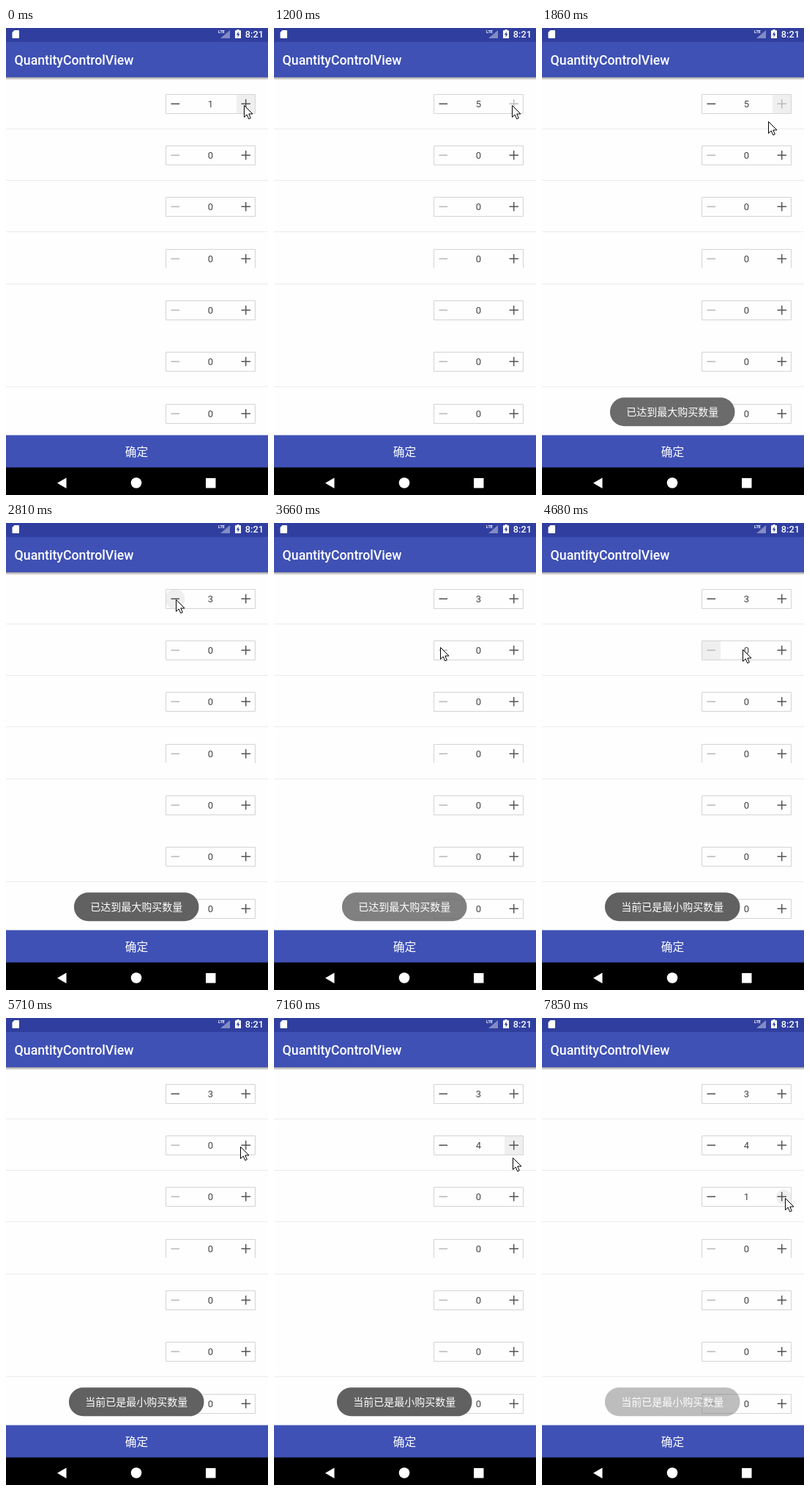
These frames come from a looping animation (358x636 px, 8 s). An HTML page:

```html
<!DOCTYPE html>
<html lang="zh-CN">
<head>
<meta charset="utf-8">
<style>
  html, body { margin: 0; width: 100%; height: 100%; overflow: hidden; background: #fefefe; }
  #stage { display: block; width: 358px; height: 636px; font-family: Roboto, "Noto Sans CJK SC", "Noto Sans CJK", sans-serif; }
  .medium { font-weight: 500; }
  .mid { text-anchor: middle; }
</style>
</head>
<body>
<svg id="stage" viewBox="0 0 358 636" fill="#fff">
  <defs>
    <linearGradient id="shade" x2="0" y2="1">
      <stop stop-opacity=".4"/><stop offset="1" stop-opacity="0"/>
    </linearGradient>
  </defs>
  <rect width="358" height="636" fill="#fefefe"/>
  <g id="list"></g>

  <rect y="67" width="358" height="4" fill="url(#shade)"/>
  <rect width="358" height="67" fill="#3f51b5"/>
  <rect width="358" height="19" fill="#303f9f"/>
  <path d="M11.5 3H17q1 0 1 1v9q0 1-1 1H9.5q-1 0-1-1V6z"/>
  <path d="M306 3V14H293z" opacity=".4"/>
  <text x="290" y="7" font-size="5.5" font-weight="700">LTE</text>
  <path d="M315.5 2h3v1.2h2.5V14h-8V3.2h2.5z"/>
  <path d="M317.7 5L314.7 9.3H316.7V12.5L319.4 8.2H317.7z" fill="#303f9f"/>
  <text class="medium" x="352" y="13" font-size="12.8" text-anchor="end">8:21</text>
  <text class="medium" x="11.6" y="50" font-size="17.7">QuantityControlView</text>

  <rect y="554.5" width="358" height="45" fill="#3f51b5"/>
  <text class="mid" x="178.5" y="583" font-size="15.7">确定</text>
  <rect y="598.5" width="358" height="38" fill="#000"/>
  <path d="M70 619.7L82.5 612.5V627z"/>
  <circle cx="178" cy="619.5" r="7.3"/>
  <rect x="273" y="613" width="13.5" height="13.5" rx=".5"/>

  <g id="toast">
    <rect y="503.3" height="39" rx="19.5" fill="#616161"/>
    <text class="mid" x="178.3" y="528" font-size="14"></text>
  </g>
  <path id="cursor" d="M.5 .5V16.5L4.2 13L6.7 18.8L9.3 17.7L6.8 12H12z" stroke="#000" stroke-linejoin="round"/>
</svg>
<script>
const LOOP = 8000, MAX = 5, FADE = 500;
const $ = id => document.getElementById(id);

// Each touch shows a ripple from down to up; every tap adds step to the row
const touches = [
  { row: 0, step: 1, down: -400, up: 510, taps: [270, 510] },
  { row: 0, step: 1, down: 660, up: 1050, taps: [660, 1200] },
  { row: 0, step: 1, down: 1470, up: 2250, taps: [] },
  { row: 0, step: -1, down: 2650, up: 3240, taps: [2650, 2810] },
  { row: 1, step: -1, down: 3900, up: 5320, taps: [] },
  { row: 1, step: 1, down: 6740, up: 7590, taps: [6740, 6890, 7040, 7160] },
  { row: 2, step: 1, down: 7730, up: LOOP, taps: [7850] }
];

const toasts = [
  { text: '已达到最大购买数量', from: 1440, to: 3517 },
  { text: '当前已是最小购买数量', from: 3990, to: 7570 }
];

const home = [325, 105];
const moves = [
  { from: 1740, to: 1860, goal: [309, 127] },
  { from: 1860, to: 2250, goal: [232, 104] },
  { from: 3100, to: 3510, goal: [227, 169] },
  { from: 4440, to: 4920, goal: [320, 175] },
  { from: 5950, to: 6100, goal: [325, 175] },
  { from: 7040, to: 7450, goal: [332, 245] }
];

function ease(x) {
  x = Math.min(Math.max(x, 0), 1);
  return x * x * (3 - 2 * x);
}

function set(node, attrs) {
  for (const name in attrs) node.setAttribute(name, attrs[name]);
}

function make(parent, tag, attrs) {
  const node = document.createElementNS('http://www.w3.org/2000/svg', tag);
  set(node, attrs);
  return parent.appendChild(node);
}

// A ripple clipped to its button
function makeRipple(parent, x, cx) {
  const cell = make(parent, 'svg', { x, width: 26, height: 26 });
  return make(cell, 'circle', { cx, cy: 13.5, fill: '#efefef' });
}

const rows = Array.from({ length: 7 }, (_, i) => {
  const g = make($('list'), 'g', { transform: `translate(0 ${Math.round(89.8 + i * 70.3)})` });
  if (i !== 4) make(g, 'path', { d: 'M0 47.5H358', stroke: '#ebebeb' });
  const ripples = { '-1': makeRipple(g, 218, 13), 1: makeRipple(g, 315, 15) };
  make(g, 'path', { d: i === 3 ? 'M218.5 26V.5H340.5V26' : 'M218.5 .5H340.5V26.5H218.5z', fill: 'none', stroke: '#d4d4d4' });
  return {
    ripples,
    minus: make(g, 'path', { d: 'M225.5 13.3H237', 'stroke-width': 1.6 }),
    plus: make(g, 'path', { d: 'M321.5 13.3H334M327.7 7V19.6', 'stroke-width': 1.5 }),
    count: make(g, 'text', { class: 'mid', x: 279.4, y: 18.3, 'font-size': 13, fill: '#444' })
  };
});

const ink = on => on ? '#555' : '#bbb';

function drawRow(row, i, t) {
  let count = i === 0 ? 1 : 0;
  const radius = { '-1': 0, 1: 0 };
  for (const { step, down, up, taps } of touches.filter(touch => touch.row === i)) {
    count += step * taps.filter(tap => tap <= t).length;
    if (t >= down && t < up) radius[step] = (t - down) / 12;
  }
  row.count.textContent = count;
  set(row.minus, { stroke: ink(count > 0) });
  set(row.plus, { stroke: ink(count < MAX) });
  for (const step in radius) set(row.ripples[step], { r: radius[step] });
}

function drawToast(t) {
  const { text, from, to } = toasts.find(toast => t < toast.to + FADE);
  const [box, label] = $('toast').children;
  const width = text.length * 14 + 44.6;
  label.textContent = text;
  set(box, { x: 178.2 - width / 2, width });
  set($('toast'), { opacity: Math.min(ease((t - from) / FADE), ease((to + FADE - t) / FADE)) });
}

function drawCursor(t) {
  let [x, y] = home;
  for (const { from, to, goal } of moves) {
    const k = ease((t - from) / (to - from));
    x += (goal[0] - x) * k;
    y += (goal[1] - y) * k;
  }
  set($('cursor'), { transform: `translate(${Math.round(x)} ${Math.round(y)})` });
}

function frame() {
  const t = performance.now() % LOOP;
  rows.forEach((row, i) => drawRow(row, i, t));
  drawToast(t);
  drawCursor(t);
  requestAnimationFrame(frame);
}
frame();
</script>
</body>
</html>
```
